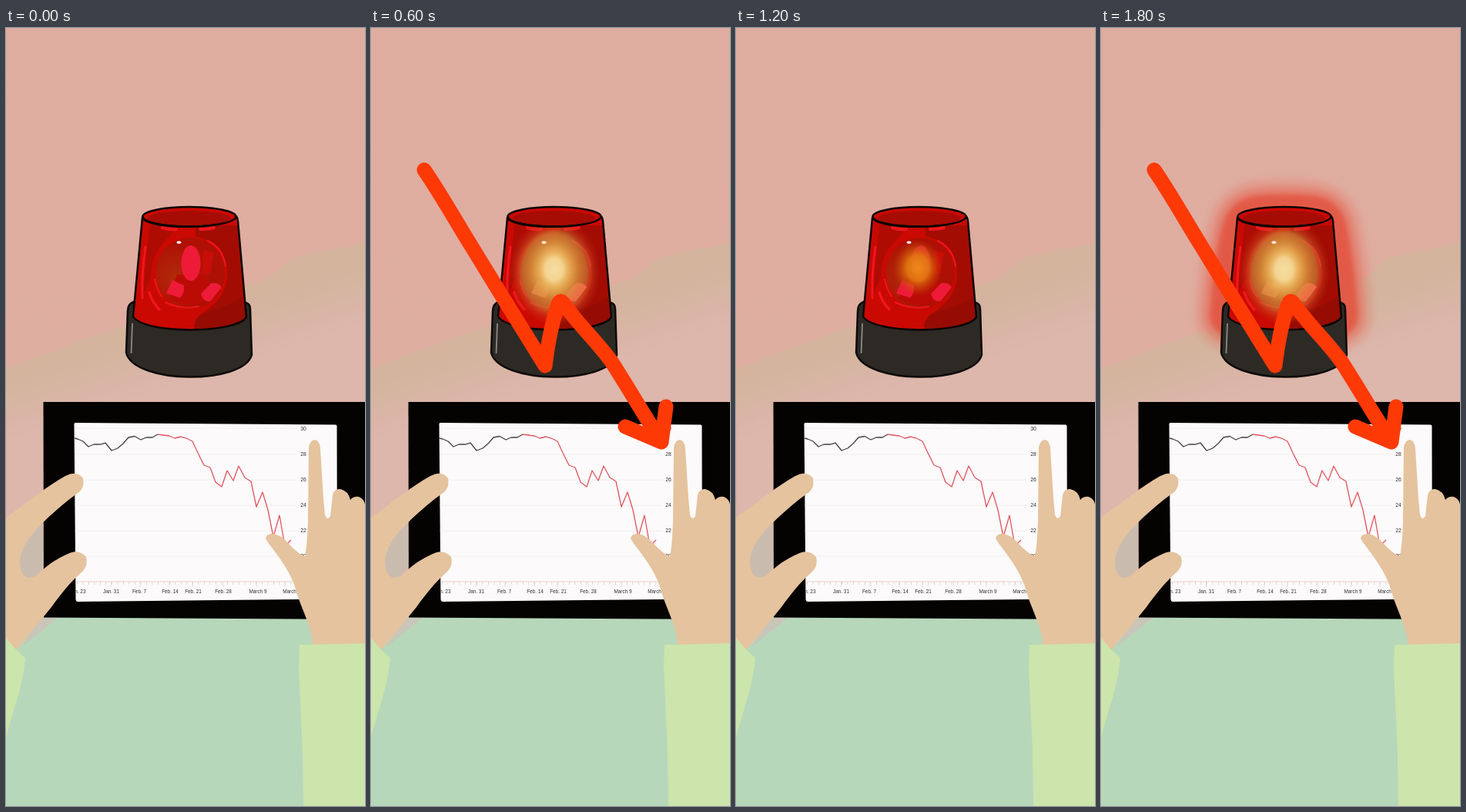
An HTML page for the animation above (1920 ms loop, 466 by 1009 pixels).

```html
<!DOCTYPE html>
<html lang="en">
<head>
<meta charset="utf-8">
<title>Alarm and falling chart</title>
<style>
html, body { margin: 0; width: 100%; height: 100%; overflow: hidden; background: #dfada0; }
svg { display: block; width: 100%; height: 100%; }
text { font-family: "Liberation Sans", Arial, sans-serif; fill: #33312f; text-anchor: middle; }
.dates { font-size: 6.4px; }
.values { font-size: 6.8px; }
.ember, .amber, .core, .arrow, .glow { opacity: 0; animation: 1920ms step-end infinite; }
.ember { animation-name: ember; }
.amber { animation-name: amber; }
.core { animation-name: core; }
.arrow { animation-name: arrow; }
.glow { animation-name: glow; }
@keyframes ember { 0%, 12.5%, 68.75%, 100% { opacity: 0 } 6.25%, 62.5% { opacity: 1 } }
@keyframes amber { 0%, 56.25%, 100% { opacity: 0 } 12.5%, 68.75% { opacity: 1 } }
@keyframes core { 0%, 56.25%, 100% { opacity: 0 } 18.75% { opacity: .5 } 25%, 75% { opacity: 1 } }
@keyframes arrow { 0%, 56.25%, 100% { opacity: 0 } 31.25%, 81.25% { opacity: 1 } }
@keyframes glow { 0%, 50%, 100% { opacity: 0 } 37.5%, 87.5% { opacity: .5 } 43.75%, 93.75% { opacity: 1 } }
</style>
</head>
<body>
<svg viewBox="0 0 466 1009" preserveAspectRatio="none">
  <defs>
    <linearGradient id="wall" x2="0" y2="1">
      <stop stop-color="#dfada0"/><stop offset="1" stop-color="#deaea2"/>
    </linearGradient>
    <linearGradient id="band" gradientUnits="userSpaceOnUse" x1="233" y1="350" x2="265" y2="448">
      <stop stop-color="#d4b49d"/><stop offset=".45" stop-color="#d5b5a0"/><stop offset="1" stop-color="#ddb6ac"/>
    </linearGradient>
    <radialGradient id="emberFill">
      <stop stop-color="#ef8a1c"/><stop offset=".45" stop-color="#e27a10" stop-opacity=".9"/>
      <stop offset="1" stop-color="#c04a08" stop-opacity="0"/>
    </radialGradient>
    <radialGradient id="amberFill">
      <stop stop-color="#ee921f" stop-opacity=".95"/><stop offset=".25" stop-color="#e08c2a" stop-opacity=".85"/>
      <stop offset=".5" stop-color="#cc7a30" stop-opacity=".75"/><stop offset=".7" stop-color="#c9863a" stop-opacity=".65"/>
      <stop offset=".82" stop-color="#d0552a" stop-opacity=".4"/><stop offset="1" stop-color="#c82c10" stop-opacity="0"/>
    </radialGradient>
    <radialGradient id="coreFill">
      <stop stop-color="#f5dda0"/><stop offset=".27" stop-color="#f3d492"/>
      <stop offset=".42" stop-color="#ebba66" stop-opacity=".9"/><stop offset=".65" stop-color="#dda046" stop-opacity=".65"/>
      <stop offset="1" stop-color="#cf8a38" stop-opacity="0"/>
    </radialGradient>
    <radialGradient id="dish" cx=".3" cy=".55">
      <stop stop-color="#b12a0b"/><stop offset="1" stop-color="#ae1005"/>
    </radialGradient>
    <filter id="soft" filterUnits="userSpaceOnUse" x="60" y="150" width="360" height="320"><feGaussianBlur stdDeviation="3"/></filter>
    <filter id="edge"><feGaussianBlur stdDeviation="1.2"/></filter>
    <path id="shell" d="M177 246L165 374C178 397 298 397 312 375L301 250Q300 244 298 244C292 262 184 262 177 246Z"/>
    <clipPath id="inShell"><use href="#shell"/></clipPath>
    <path id="screen" d="M90 512L428 514.500Q430 515 429.500 518L430 740.500L93 744Q91 744 90.500 741L88.500 515Q88 512 90 512Z"/>
    <clipPath id="inScreen"><use href="#screen"/></clipPath>
    <path id="halo" d="M170 372C172 335 178 290 186 262Q190 248 204 246Q238 242 274 246Q288 248 291 262C297 290 303 335 305 372"/>
  </defs>

  <rect width="466" height="1009" fill="url(#wall)"/>
  <path d="M480 275L440 284L400 291L370 299L345 322L300 340L160 385L105 402L60 419L0 442V780H480Z" fill="url(#band)" filter="url(#edge)"/>
  <path d="M0 765L466 764V1009H0Z" fill="#b7d7ba"/>
  <path d="M44 764H68L20 803Z" fill="#c9c5b9"/>

  <g class="glow" fill="none" stroke-linecap="round" stroke-linejoin="round">
    <g filter="url(#soft)">
      <use href="#halo" stroke="#e8604e" stroke-width="98" opacity=".2"/>
      <use href="#halo" stroke="#e55743" stroke-width="78" opacity=".35"/>
      <use href="#halo" stroke="#e24b36" stroke-width="58" opacity=".7"/>
    </g>
  </g>

  <g stroke-linejoin="round">
    <path d="M166 355Q158 358 158 367L156 421C166 462 308 463 319 424L317 364Q317 357 310 356Z" fill="#2d2a25" stroke="#0d0a08" stroke-width="2.500"/>
    <path d="M164 383L162.500 422" stroke="#8b8985" stroke-width="1.800"/>
    <use href="#shell" fill="#c90902"/>
    <g clip-path="url(#inShell)">
      <path d="M246 256H304L314 380L290 390H250Q236 380 262 365Q292 342 286 308Q278 277 246 270Z" fill="#a30c03"/>
      <path d="M186 255H226L205 278Q188 294 188 324L178 345Z" fill="#ae0c03"/>
      <ellipse cx="239" cy="318" rx="45" ry="46" fill="url(#dish)"/>
      <path d="M256 288L270 292L265 318L254 322Z" fill="#c90d08"/>
      <path d="M222 320H258L267 351Q238 367 211 351Z" fill="#ba0c05"/>
      <path d="M245 391Q240 376 266 366Q290 361 312 345V392Z" fill="#960c03"/>
      <g fill="#ee1b38">
        <ellipse cx="240" cy="305" rx="12.500" ry="23"/>
        <path d="M216 327L231 334Q232 344 226 350L208 344Z"/>
        <path d="M253 345L266 331Q276 330 280 336L266 354Q257 357 253 345Z"/>
      </g>
      <g fill="none" stroke="#f0161d" stroke-width="2" stroke-linecap="round">
        <path d="M181 284Q176 315 177 350" stroke-width="3"/>
        <path d="M186 343Q190 356 199 365" stroke-width="3.500"/>
        <path d="M262 276Q282 286 285 309M207 356Q230 366 250 361M193 326Q196 340 202 348"/>
        <path d="M203 259Q212 262 221 261M252 261Q262 261 270 259" stroke-width="4"/>
      </g>
      <ellipse class="ember" cx="236" cy="311" rx="32" ry="37" fill="url(#emberFill)"/>
      <g class="amber">
        <ellipse cx="238" cy="316" rx="60" ry="71" fill="url(#amberFill)"/>
        <path d="M253 345L266 331Q276 330 280 336L266 354Q257 357 253 345Z" fill="#f36f49" opacity=".8"/>
        <path d="M216 327L231 334Q232 344 226 350L208 344Z" fill="#ea8b4d" opacity=".7"/>
      </g>
      <ellipse class="core" cx="237.500" cy="313" rx="42" ry="53" fill="url(#coreFill)"/>
    </g>
    <ellipse cx="224.500" cy="278" rx="3" ry="1.800" fill="#fff0e6"/>
    <use href="#shell" fill="none" stroke="#0d0503" stroke-width="2.500"/>
    <ellipse cx="238" cy="244.500" rx="60.500" ry="12.500" fill="#cb0802" stroke="#0d0503" stroke-width="2.500"/>
    <path d="M184 249Q180 238 238 237Q296 238 291 250Q270 256 238 256Q202 256 184 249Z" fill="#a60c04"/>
  </g>

  <path d="M48.500 485H466V767L49 764.500Z" fill="#050302"/>
  <use href="#screen" fill="#fcfafa"/>
  <g clip-path="url(#inScreen)" fill="none">
    <path d="M89 519H378M89 553H378M89 586H378M89 619H378M89 652H378M89 685H378" stroke="#f1eeee"/>
    <path d="M89 718H380" stroke="#ecd3d0"/>
    <path d="M92 720H380" stroke="#dfc2be" stroke-width="4" stroke-dasharray=".7 6.800"/>
    <path d="M136.500 718V725M174 718V725M212 718V725M242 718V725M282 718V725M325 718V725M362 718V725" stroke="#e3ceca" stroke-width=".7"/>
    <g stroke-width="1.300" stroke-linejoin="round">
      <polyline stroke="#444140" points="89,532 93,533 100,536 107,543 114,540 122,540 129,538 137,548 145,545 152,539 159,531 167,529.500 175,534 182,531 190,531 197,527"/>
      <polyline stroke="#e05560" points="197,527 204,528 212,529 219,532 227,530 234,532 242,536 249,551 257,567 265,570 272,589 280,595 287,574 295,587 302,568 310,583 318,588 325,621 333,602 340,625 347,660 355,632 362,672 370,664"/>
    </g>
    <g class="dates">
      <text x="93" y="733">Jan. 23</text><text x="136.500" y="733">Jan. 31</text>
      <text x="173" y="733">Feb. 7</text><text x="213" y="733">Feb. 14</text>
      <text x="243" y="733">Feb. 21</text><text x="282" y="733">Feb. 28</text>
      <text x="327" y="733">March 9</text><text x="372.500" y="733">March 16</text>
    </g>
    <g class="values">
      <text x="386" y="522">30</text><text x="386" y="555">28</text><text x="386" y="588">26</text>
      <text x="386" y="621">24</text><text x="386" y="654">22</text><text x="386" y="687">20</text>
    </g>
  </g>

  <path d="M48 640L24 665L14 690L18 712H36L48 699Z" fill="#c9bcae"/>
  <g fill="#e5c39e">
    <path d="M0 635C25 617 55 593 77 581Q92 573 100 584Q102 595 95 602C77 614 51 637 36 654Q20 672 18 690Q18 709 28 713Q37 714 45 705Q60 691 78 683Q94 674 104 686Q107 698 98 706C84 718 72 733 59 751L14 806L0 800Z"/>
    <path d="M398 801C399 781 382 750 377 731C371 708 357 690 346 675Q339 666 337 662Q338 655 348 656Q359 659 367 669Q379 682 388 685Q391 671 392 640L393 544Q395 534 401 534Q407 535 408 545L412 610L414 631Q417 640 421 633L424 606Q426 597 434 598Q444 600 447 612Q451 607 458 608Q465 611 466 618V801Z"/>
  </g>
  <g fill="#cce5ac">
    <path d="M0 791L13 806L25 817Q24 833 18 858L0 919Z"/>
    <path d="M381 800L466 798V1009H386L385 940L380 830Z"/>
  </g>

  <path class="arrow" d="M69 184C91 216 111 252 131 284L169 346L226 438Q232 390 243 358Q246 350 252 360C272 388 295 408 313 434C331 462 351 496 377 537M330 517L377 537L383 491" fill="none" stroke="#fd3906" stroke-width="19" stroke-linecap="round" stroke-linejoin="round"/>
</svg>
</body>
</html>
```
